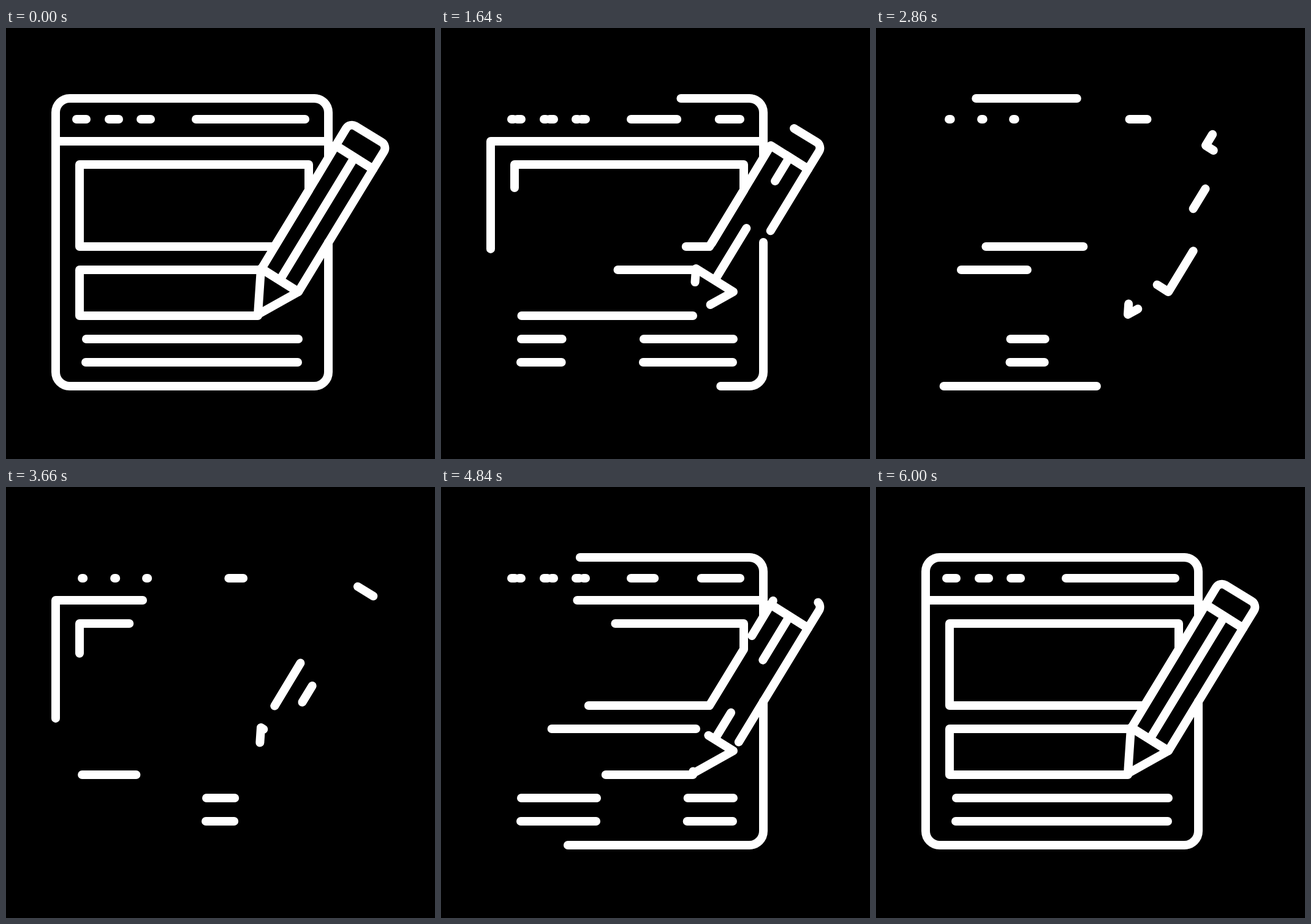
An HTML page that plays this animation: 700 by 704 pixels, repeating every 7200 ms.

```html
<!DOCTYPE html>
<html lang="en">
<head>
<meta charset="utf-8">
<title>Line icon</title>
<style>
  html, body { margin: 0; width: 100%; height: 100%; overflow: hidden; background: #000; }
  svg { display: block; width: 100%; height: 100%; }
  path { fill: none; stroke: #fff; stroke-width: 14; stroke-linecap: round; stroke-linejoin: round; }
</style>
</head>
<body>
<svg viewBox="0 0 700 704">
  <!-- window header and body -->
  <path d="M526 185H81V138A23 23 0 0 1 104 115H503A23 23 0 0 1 526 138Z"/>
  <path d="M526 210V185H81V562A23 23 0 0 0 104 585H503A23 23 0 0 0 526 562V350"/>
  <!-- header dashes and bar -->
  <path d="M131 149H115"/>
  <path d="M184 149H168"/>
  <path d="M236 149H220"/>
  <path d="M310 149H488"/>
  <!-- content boxes -->
  <path d="M494 223H120V357H438L494 265Z"/>
  <path d="M411 470H120V395H416"/>
  <!-- text lines -->
  <path d="M477 508H131"/>
  <path d="M476 546H130"/>
  <!-- pencil: shaft, ridge, tip, eraser -->
  <path d="M599 230.5L538 192L417 393L477 431Z"/>
  <path d="M447 411.5L568.5 211.5"/>
  <path d="M477 431L416 393L411 468Z"/>
  <path d="M599 230.5L616.6 201.9A11 11 0 0 0 613 186.6L570.1 160.3A11 11 0 0 0 555.1 163.8L538 192Z"/>
</svg>
<script>
  const LOOP = 7200, STEP = 20, BEGIN = 600, HALF = 2700;
  const paths = document.querySelectorAll('path');
  paths.forEach(path => path.setAttribute('pathLength', 1));

  // Every outline shrinks to nothing and grows back while sliding against its direction.
  function draw(now) {
    const time = Math.floor(now % LOOP / STEP) * STEP;
    const phase = Math.min(Math.max((time - BEGIN) / HALF, 0), 2);
    const start = phase < 1 ? -phase / 2 : 1 - phase * 1.5;
    const length = Math.abs(1 - phase);
    for (const { style } of paths) {
      style.visibility = length ? 'visible' : 'hidden';
      style.strokeDasharray = length === 1 ? 'none' : `${length} ${1 - length}`;
      style.strokeDashoffset = -start;
    }
  }

  function tick() {
    draw(performance.now());
    requestAnimationFrame(tick);
  }
  tick();
</script>
</body>
</html>
```
